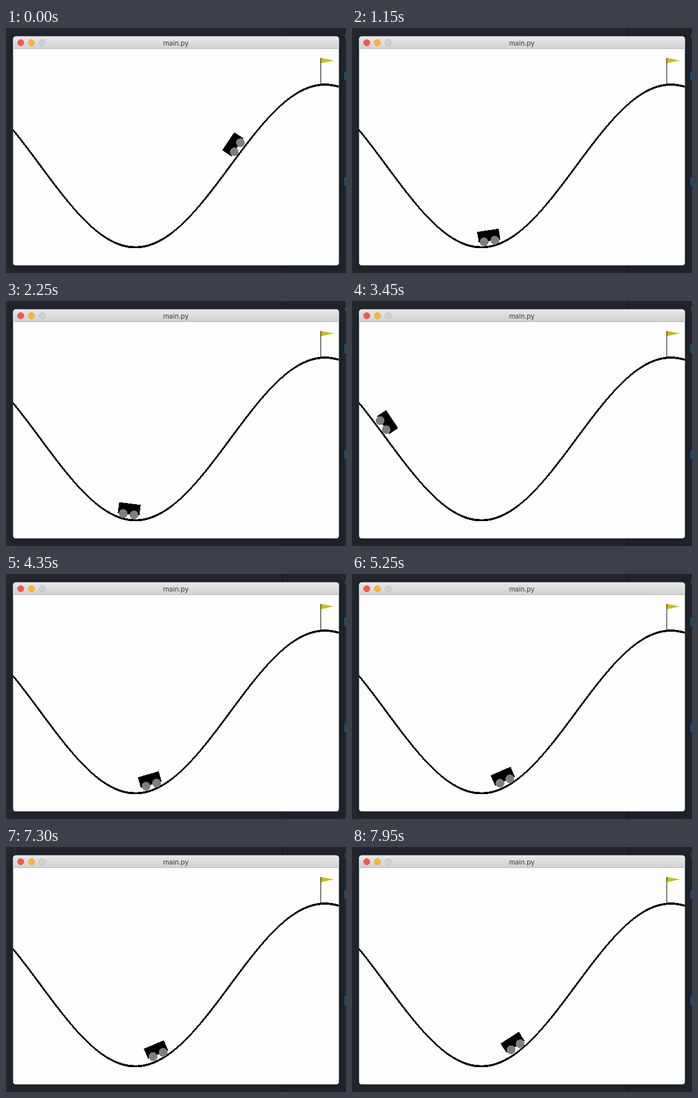
An HTML page that plays this animation: 600 px wide and 433 px high, repeating every 8000 ms.

```html
<!DOCTYPE html>
<html lang="en">
<head>
<meta charset="utf-8">
<title>Mountain car</title>
<style>
  html, body { margin: 0; width: 100%; height: 100%; overflow: hidden; background: #21242c; }
  svg { display: block; width: 100vw; height: 100vh; }
</style>
</head>
<body>
<svg viewBox="0 0 600 433">
  <defs>
    <linearGradient id="bar" x2="0" y2="1">
      <stop offset="0" stop-color="#eae9ea"/>
      <stop offset="1" stop-color="#d1d0d1"/>
    </linearGradient>
    <clipPath id="pane"><rect x="12.5" y="37" width="575" height="382.5"/></clipPath>
    <filter id="blur" x="-10%" y="-10%" width="120%" height="120%"><feGaussianBlur stdDeviation="6"/></filter>
  </defs>

  <rect width="600" height="433" fill="#23262e"/>
  <rect x="487" width="113" height="433" fill="#21242c"/>
  <rect x="486" width="2" height="433" fill="#191b21"/>
  <rect x="12" y="19" width="576" height="404" fill="#101218" opacity=".5" filter="url(#blur)"/>
  <g fill="#174f7a">
    <rect x="598" y="11" width="2" height="7"/>
    <rect x="597" y="77" width="3" height="15"/>
    <rect x="597" y="264" width="3" height="15"/>
  </g>

  <rect x="12.5" y="14.8" width="575" height="404.7" rx="4.5" fill="#fefefe"/>
  <path d="M12.5 37V19.8a5 5 0 0 1 5-5H582.5a5 5 0 0 1 5 5V37Z" fill="url(#bar)"/>
  <rect x="12.5" y="36" width="575" height="1" fill="#b4b4b4"/>
  <g stroke-width=".7">
    <circle cx="26" cy="26" r="5.6" fill="#fc5550" stroke="#e0443e"/>
    <circle cx="45" cy="26" r="5.6" fill="#fdb62a" stroke="#dea123"/>
    <circle cx="64" cy="26" r="5.6" fill="#d0d0d0" stroke="#b9b9b9"/>
  </g>
  <text x="299.8" y="30.6" text-anchor="middle" font-family="Inter, Roboto, sans-serif" font-size="12.2" fill="#3e3e3e">main.py</text>

  <g clip-path="url(#pane)" shape-rendering="crispEdges">
    <g id="track" stroke="#000" stroke-linecap="round"></g>
    <g id="car">
      <rect x="-19.17" y="-28.75" width="38.33" height="19.17"/>
      <circle cx="9.58" cy="-9.58" r="7.67" fill="#7f7f7f"/>
      <circle cx="-9.58" cy="-9.58" r="7.67" fill="#7f7f7f"/>
    </g>
    <path d="M555.5 52.5V100.4" stroke="#000"/>
    <path d="M555.5 52.7V62.2L578.5 57.4Z" fill="#c6c400"/>
  </g>
</svg>
<script>
const LOOP = 8000, FRAME = 50, STEP = 17;
const LEFT = -1.2, WIDTH = 1.8, SCALE = 575 / WIDTH;
const sx = x => 12.3 + (x - LEFT) * SCALE;
const sy = x => 419.5 - (0.45 * Math.sin(3 * x) + 0.55) * SCALE;

// Each run restarts the car at x. Without drag it pushes the way it rolls;
// with drag it leans right until it rests.
const runs = [
  { at: 0, x: 0.0645, drag: 1 },
  { at: 250, x: -0.54, drag: 0 },
  { at: 2250, x: -0.565, drag: 0 },
  { at: 4250, x: -0.4315, drag: 0.05 },
  { at: 7500, x: -0.495, drag: 0 }
];

function position(t) {
  let { at, x, drag } = runs.findLast(run => run.at <= t);
  let v = 0;
  for (let n = Math.floor((t - at) / STEP); n > 0; n--) {
    const push = drag || v >= 0 ? 0.001 : -0.001;
    v = (v + push - 0.0025 * Math.cos(3 * x)) * (1 - drag);
    x += v;
    if (x < LEFT) { x = LEFT; v = 0; }
  }
  return x;
}

// The track is thinner where it is steep.
function drawTrack() {
  const n = 99, at = i => LEFT + WIDTH * i / n;
  let lines = '';
  for (let i = 0; i < n; i++) {
    const [x1, x2] = [sx(at(i)), sx(at(i + 1))];
    const [y1, y2] = [sy(at(i)), sy(at(i + 1))];
    const dx = x2 - x1, dy = Math.abs(y2 - y1);
    const w = 3.8 * Math.max(dx, dy) / Math.hypot(dx, dy);
    lines += `<path d="M${x1} ${y1}L${x2} ${y2}" stroke-width="${w}"/>`;
  }
  document.getElementById('track').innerHTML = lines;
}

const car = document.getElementById('car');
function draw(ms) {
  const x = position(Math.floor(ms % LOOP / FRAME) * FRAME);
  const tilt = -Math.cos(3 * x) * 180 / Math.PI;
  car.setAttribute('transform', `translate(${sx(x)} ${sy(x)}) rotate(${tilt})`);
}

drawTrack();
const start = performance.now();
function tick() {
  draw(performance.now() - start);
  requestAnimationFrame(tick);
}
tick();
</script>
</body>
</html>
```
